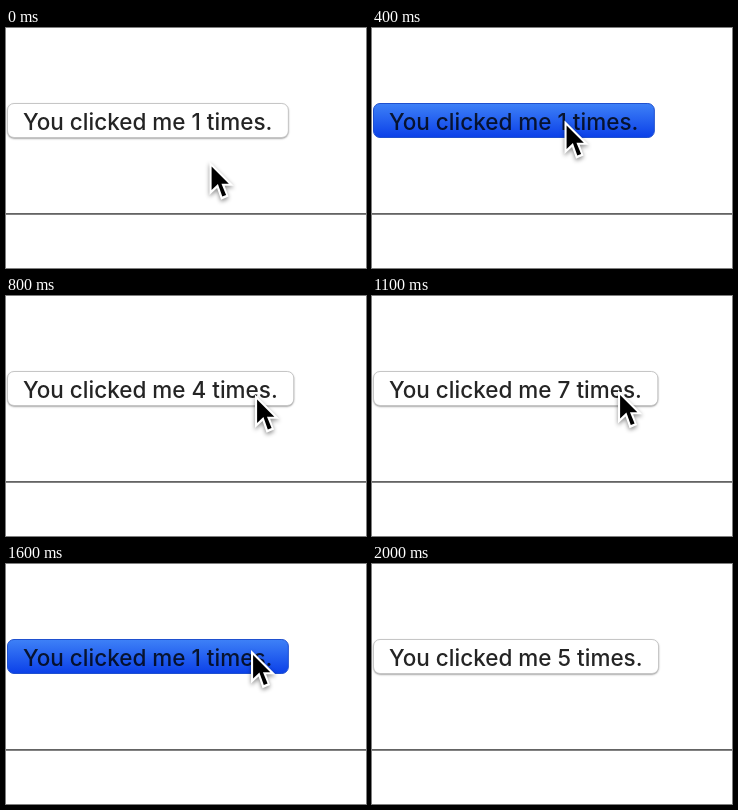
An HTML page with a canvas for the animation above (2.4 s loop, 360 by 240 pixels).

```html
<!DOCTYPE html>
<html lang="en">
<head>
<meta charset="utf-8">
<title>Click counter</title>
<style>
  html, body { margin: 0; width: 100%; height: 100%; overflow: hidden; background: #fff; }
  canvas { display: block; }
</style>
</head>
<body>
<canvas id="stage" width="360" height="240"></canvas>
<script>
const ctx = document.getElementById('stage').getContext('2d');
const LOOP = 2400;
const VIEW_TOP = 54;

// Each pose holds until the next: start time, count, pointer tip, button held down.
const poses = [
  { at: 0, count: 1, tip: [203.5, 133.5] },
  { at: 100, count: 1, tip: [214.5, 100] },
  { at: 400, count: 1, tip: [192.5, 92.5], pressed: true },
  { at: 500, count: 2, tip: [214, 96] },
  { at: 600, count: 3, tip: [231.5, 98.5] },
  { at: 700, count: 3, tip: [241, 98.5] },
  { at: 800, count: 4, tip: [249, 98.5] },
  { at: 900, count: 5, tip: [251, 98.5] },
  { at: 1000, count: 6, tip: [250, 97] },
  { at: 1100, count: 7, tip: [246, 94] },
  { at: 1200, count: 7, tip: [214, 60] },
  { at: 1300, count: 7, tip: [174.5, 25] },
  { at: 1400, count: 7 },
  { at: 1500, count: 1, tip: [240, 83] },
  { at: 1600, count: 1, tip: [245, 86], pressed: true },
  { at: 1700, count: 2, tip: [245, 86] },
  { at: 1800, count: 3, tip: [246, 85] },
  { at: 1900, count: 4, tip: [246, 81] },
  { at: 2000, count: 5 }
];

const arrowOutline = new Path2D(
  'M0 0V16L3.6 12.6 5.5 18.2 9.1 16.7 7.2 11.6H11.6Z');
const arrowFill = new Path2D(
  'M1 2.4V13.6L4 10.7 6.1 16.7 7.9 15.9 5.7 10.6H9.2Z');

function shadow(color, blur, y) {
  ctx.shadowColor = color;
  ctx.shadowBlur = blur;
  ctx.shadowOffsetY = y;
}

function drawButton(count, pressed) {
  const label = `You clicked me ${count} times.`;
  ctx.font = '500 22.5px Inter, sans-serif';
  const width = ctx.measureText(label).width + 31.5;

  ctx.save();
  ctx.beginPath();
  ctx.roundRect(1.5, 75.5, width, 34, 6.5);
  if (pressed) {
    const blue = ctx.createLinearGradient(0, 75, 0, 110);
    blue.addColorStop(0, '#3f82f7');
    blue.addColorStop(1, '#0a3fe8');
    ctx.fillStyle = blue;
    ctx.strokeStyle = '#1f50cf';
  } else {
    ctx.fillStyle = '#fff';
    ctx.strokeStyle = '#c6c6c6';
    shadow('rgba(0,0,0,.5)', 2, 1);
  }
  ctx.fill();
  shadow('transparent', 0, 0);
  ctx.stroke();
  ctx.restore();

  ctx.fillStyle = pressed ? 'rgba(0,0,0,.8)' : '#242424';
  ctx.fillText(label, 17, 102);
}

function drawPointer([x, y]) {
  ctx.save();
  ctx.beginPath();
  ctx.rect(0, VIEW_TOP, 360, 240);
  ctx.clip();
  ctx.translate(x, y);
  ctx.scale(2.1, 2.1);
  shadow('rgba(0,0,0,.45)', 4, 2);
  ctx.fillStyle = '#fff';
  ctx.fill(arrowOutline);
  shadow('transparent', 0, 0);
  ctx.fillStyle = '#000';
  ctx.fill(arrowFill);
  ctx.restore();
}

function draw(time) {
  const pose = poses.findLast(p => p.at <= time);
  ctx.fillStyle = '#fff';
  ctx.fillRect(0, 0, 360, 240);
  ctx.fillStyle = '#646464';
  ctx.fillRect(0, 185, 360, 1.8);
  drawButton(pose.count, pose.pressed);
  if (pose.tip) drawPointer(pose.tip);
}

const start = performance.now();
function tick() {
  draw((performance.now() - start) % LOOP);
  requestAnimationFrame(tick);
}
tick();
</script>
</body>
</html>
```
